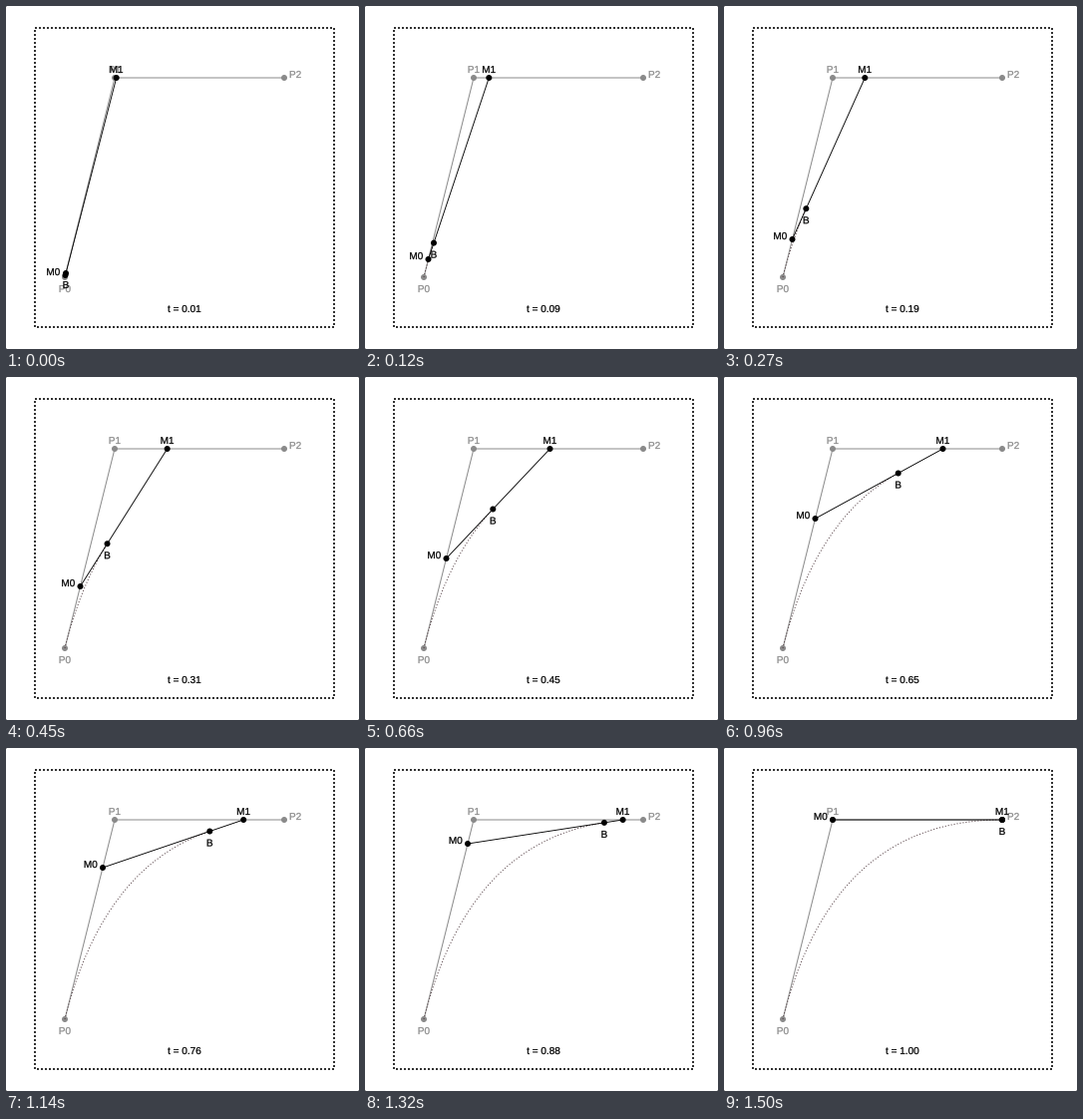
Animation of 354 by 344 pixels, one loop 2400 ms. Source, as a matplotlib script:

```python
import numpy as np
import matplotlib.pyplot as plt
from matplotlib.animation import FuncAnimation
from matplotlib.patches import Circle, Rectangle
from matplotlib.patheffects import Stroke

W, H, DPI = 354, 344, 72
STEP_MS, LOOP_MS = 30, 2400
GRAY, BLACK, CURVE = "#8a8a8a", "black", "#4c363b"

plt.rcParams.update({
    "font.family": "Liberation Sans",
    "font.size": 10,
    "toolbar": "None",
})

P0, P1, P2 = (np.array(p, float) for p in [(59, 272), (109, 72), (279, 72)])

# label offset from its point, horizontal alignment
ABOVE = (0, -5, "center")
BELOW = (0, 15, "center")
LEFT = (-5, 0, "right")
RIGHT = (5, 0, "left")

fig = plt.figure(figsize=(W / DPI, H / DPI), dpi=DPI, facecolor="white")
ax = fig.add_axes([0, 0, 1, 1])
ax.set(xlim=(0, W), ylim=(H, 0))
ax.axis("off")


def add_line(points, color, z, width=1.0, dashes=None):
    """Plot a polyline; dashes are given in pixels."""
    xs, ys = zip(*points)
    line, = ax.plot(xs, ys, color=color, lw=width, zorder=z, snap=False,
                    solid_capstyle="butt", dash_capstyle="butt",
                    dash_joinstyle="miter")
    if dashes:
        line.set_linestyle((0, [d / width for d in dashes]))
    return line


def add_text(x, y, text, color, align, z):
    # the thin outline gives slightly heavier, subpixel-placed letters
    return ax.text(x, y, text, color=color, ha=align, va="baseline",
                   zorder=z, path_effects=[Stroke(linewidth=0.25)])


class Knot:
    """A dot with a name beside it."""

    def __init__(self, name, side, color, z, pos=(0, 0)):
        self.dx, self.dy, align = side
        self.dot = ax.add_patch(Circle(pos, 3, color=color, lw=0, zorder=z))
        self.label = add_text(0, 0, name, color, align, z)
        self.move(pos)

    def move(self, pos):
        self.dot.center = tuple(pos)
        self.label.set_position((pos[0] + self.dx, pos[1] + self.dy))


def bezier(t):
    t = np.asarray(t)[..., None]
    return (1 - t) ** 2 * P0 + 2 * t * (1 - t) * P1 + t ** 2 * P2


def progress(i):
    # odd hundredths first, even ones for the last quarter
    return min(1.0, 0.02 * i + (0.01 if i <= 37 else 0))


# window corners
for cx in (0, W - 1):
    for cy in (0, H - 1):
        ax.add_patch(Rectangle((cx, cy), 1, 1, color="#aaaaaa", lw=0))

# dotted frame
add_line([(29, 22), (329, 22), (329, 322), (29, 322), (29, 22)],
         BLACK, 1, width=1.6, dashes=(2, 2))

# fixed control polygon
add_line([P0, P1, P2], GRAY, 2)
Knot("P0", BELOW, GRAY, 3, P0)
Knot("P1", ABOVE, GRAY, 3, P1)
Knot("P2", RIGHT, GRAY, 3, P2)

# moving parts
curve = add_line([P0, P0], CURVE, 4, dashes=(1, 2))
bar = add_line([P0, P1], BLACK, 5, width=0.9)
m0 = Knot("M0", LEFT, BLACK, 6)
m1 = Knot("M1", ABOVE, BLACK, 6)
b = Knot("B", BELOW, BLACK, 6)
readout = add_text(179, 307, "", BLACK, "center", 6)


def draw(i):
    t = progress(i)
    q0 = P0 + (P1 - P0) * t
    q1 = P1 + (P2 - P1) * t
    m0.move(q0)
    m1.move(q1)
    b.move(bezier(t))
    bar.set_data(*zip(q0, q1))
    curve.set_data(*bezier(np.linspace(0, t, 101)).T)
    readout.set_text(f"t = {t:.2f}")
    return []


anim = FuncAnimation(fig, draw, frames=LOOP_MS // STEP_MS, interval=STEP_MS,
                     repeat=True, repeat_delay=0)
plt.show()
```
